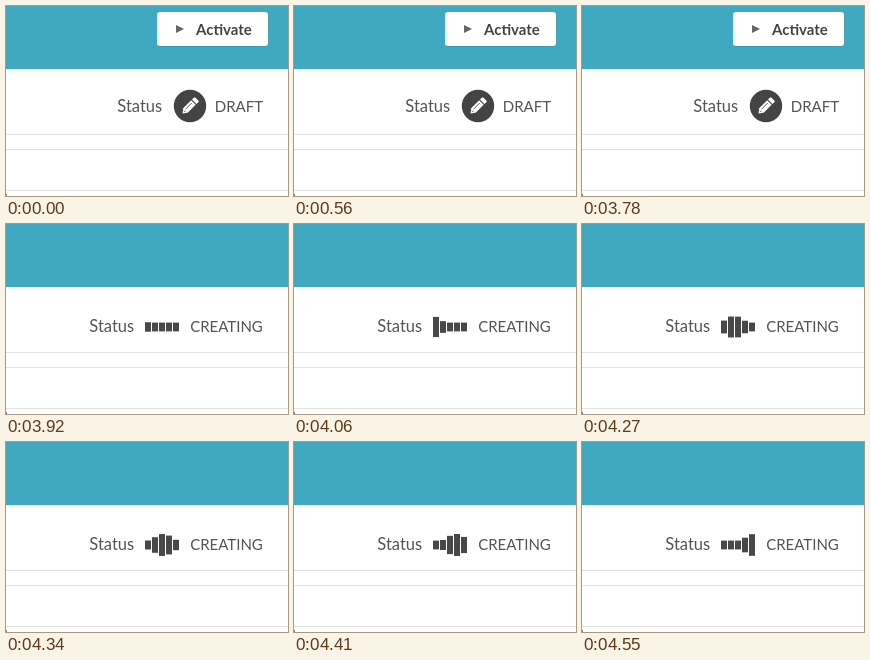
These frames come from a looping animation (282 by 190 pixels, 4620 ms). An HTML page:

```html
<!DOCTYPE html>
<html lang="en">
<head>
<meta charset="utf-8">
<title>Status</title>
<style>
  html, body { margin: 0; width: 100%; height: 100%; overflow: hidden; background: #fff; }
  svg { display: block; width: 100vw; height: 100vh; }
  text { font-family: Lato, "Open Sans", sans-serif; fill: #555; }
  .label { font-size: 16.5px; }
  .state { font-size: 15px; }
  .action { font-size: 15px; font-weight: 700; fill: #444; }
</style>
</head>
<body>
<svg viewBox="0 0 282 190">
  <rect width="282" height="190" fill="#fff"/>
  <rect width="282" height="63" fill="#40a8c0"/>
  <path d="M0 128.5H282M0 143.5H282M0 184.5H282" stroke="#e2e2e2"/>
  <rect y="188" width="1" height="2" fill="#888"/>

  <g id="draft">
    <rect x="151" y="7" width="111" height="34" rx="3" fill="#328ca1" opacity=".5"/>
    <rect x="151" y="6" width="111" height="34" rx="3" fill="#fff"/>
    <path d="M170 19L178 23L170 27Z" fill="#666"/>
    <text class="action" x="190" y="29">Activate</text>
    <text class="label" x="111.3" y="106">Status</text>
    <circle cx="184" cy="100" r="16.2" fill="#444"/>
    <g transform="translate(184 100) rotate(-45)">
      <path d="M-10.5 0L-6.5-3.2H4.8V3.2H-6.5ZM6-3.2H8.6Q9.8-3.2 9.8-2V2Q9.8 3.2 8.6 3.2H6Z" fill="#fff"/>
      <path d="M-5.5-.9H3.5M-7.6-1.2V1.2" stroke="#444" stroke-width=".8" fill="none"/>
    </g>
    <text class="state" x="208.8" y="106">DRAFT</text>
  </g>

  <g id="creating">
    <text class="label" x="83.3" y="108">Status</text>
    <g id="bars" fill="#484848"></g>
    <text class="state" x="184.2" y="108">CREATING</text>
  </g>
</svg>
<script>
  const LOOP = 4620, STEP = 70, SWITCH = 3920;
  const FIRST_PEAK = 4122, STAGGER = 100, SWING = 240;
  const BAR_HEIGHT = 22, BAR_MID = 103;
  const byId = id => document.getElementById(id);
  const draft = byId('draft'), creating = byId('creating');

  const bars = Array.from({ length: 5 }, (_, i) => {
    const bar = document.createElementNS('http://www.w3.org/2000/svg', 'rect');
    bar.setAttribute('x', 139 + 7 * i);
    bar.setAttribute('width', 6);
    return byId('bars').appendChild(bar);
  });

  // cubic-bezier(.42, 0, .58, 1), solved by bisection
  function easeInOut(x) {
    let lo = 0, hi = 1;
    for (let i = 0; i < 20; i++) {
      const s = (lo + hi) / 2;
      const bx = 3 * s * (1 - s) * (0.42 * (1 - s) + 0.58 * s) + s ** 3;
      if (bx < x) lo = s; else hi = s;
    }
    return lo * lo * (3 - 2 * lo);
  }

  function render(ms) {
    const t = Math.floor((ms % LOOP) / STEP) * STEP;
    const busy = t >= SWITCH;
    draft.style.display = busy ? 'none' : '';
    creating.style.display = busy ? '' : 'none';
    bars.forEach((bar, i) => {
      const away = Math.min(1, Math.abs(t - FIRST_PEAK - STAGGER * i) / SWING);
      const h = BAR_HEIGHT * (1 - 0.6 * easeInOut(away));
      bar.setAttribute('y', BAR_MID - h / 2);
      bar.setAttribute('height', h);
    });
  }

  const start = performance.now();
  function tick() {
    render(performance.now() - start);
    requestAnimationFrame(tick);
  }
  tick();
</script>
</body>
</html>
```
